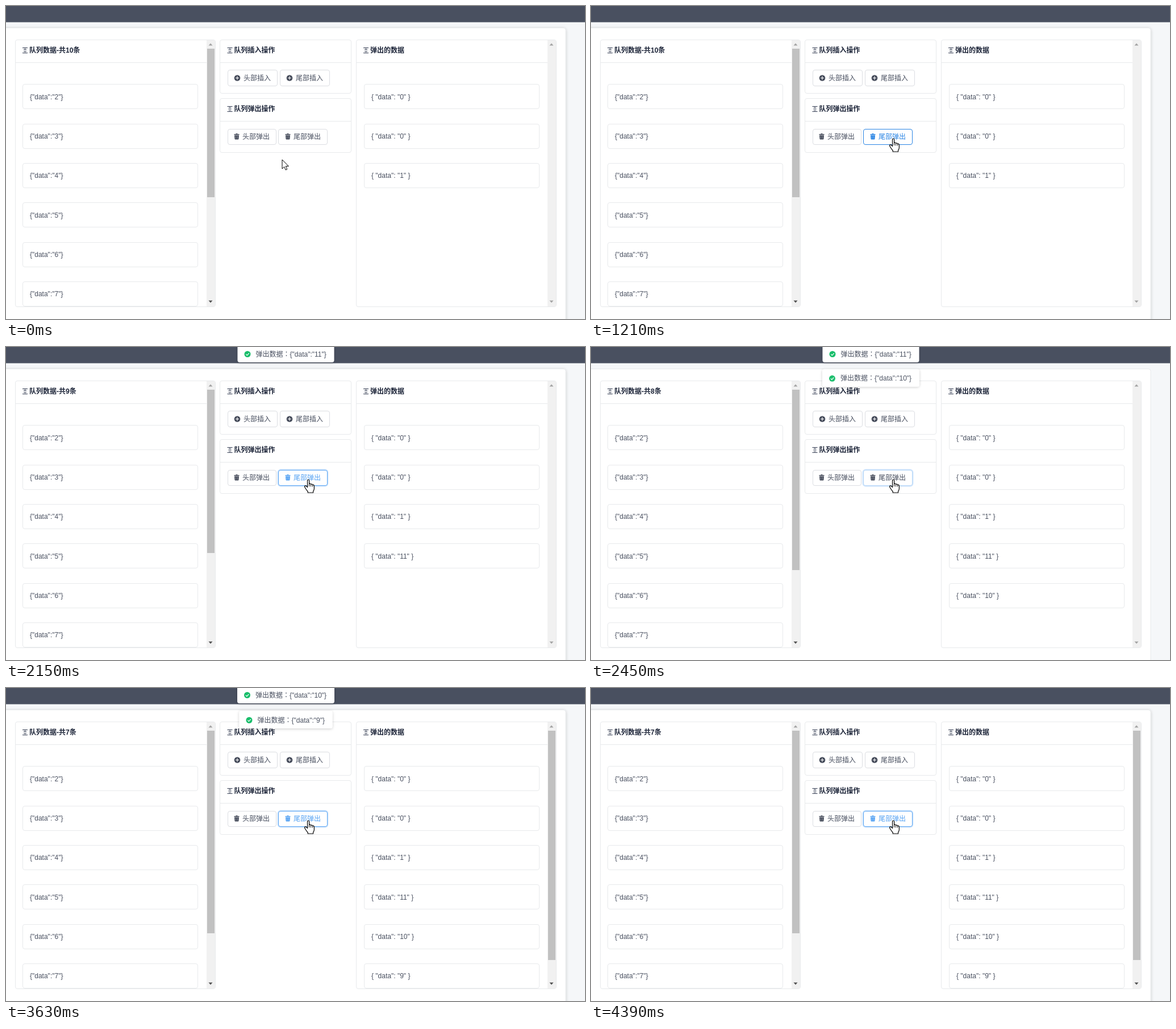
An HTML page for the animation above (4560 ms loop, 1019 by 550 pixels).

```html
<!DOCTYPE html>
<html lang="zh-CN">
<head>
<meta charset="utf-8">
<title>队列操作</title>
<style>
  html, body { margin: 0; width: 100%; height: 100%; overflow: hidden; background: #f5f7f9; }
  svg { display: block; width: 1019px; height: 550px; }
  text { font: 12px "Liberation Sans", Arial, "Noto Sans CJK SC", "Noto Sans CJK", sans-serif; fill: #495060; white-space: pre; }
  .title { font-weight: 700; fill: #1c2438; }
  .colon { font-family: "Noto Sans CJK JP", "Noto Sans CJK", sans-serif; }
  .box { fill: #fff; stroke: #e8eaec; }
  .btn { fill: #fff; stroke: #dcdee2; }
</style>
</head>
<body>
<svg id="stage" viewBox="0 0 1019 550"></svg>
<script>
const LOOP = 4560, SLOT = 44;
const stage = document.getElementById('stage');

const TICKS = [0, 690, 760, 830, 910, 980,
  1140, 1210, 1290, 1370, 1450, 1530, 1610,
  2070, 2150, 2220, 2300, 2380, 2450,
  2620, 2700, 2770, 2840, 2910, 3000, 3080, 3150,
  3630, 3690, 3770, 3850, 3920, 4240, 4320, 4390];
const POPS = [1290, 2220, 2700];
const THUMB_ENDS = [336, 362, 392, 431];
const MESSAGES = [
  { value: 11, width: 170, enter: 1270, leave: 2776 },
  { value: 10, width: 171, enter: 2180, leave: 3630 },
  { value: 9, width: 164, enter: 2690, leave: 4195 }
];

const clamp = v => Math.max(0, Math.min(1, v));
const ease = v => { v = clamp(v); return v * v * (3 - 2 * v); };
const within = (t, a, b) => t >= a && t < b;

const rect = (x, y, w, h, attrs = '') => `<rect x="${x}" y="${y}" width="${w}" height="${h}" ${attrs}/>`;
const box = (x, y, w, h, cls = 'box') => rect(x + .5, y + .5, w, h, `rx="3.5" class="${cls}"`);
const text = (x, y, s, attrs = '') => `<text x="${x}" y="${y}" ${attrs}>${s}</text>`;
const line = (x1, x2, y) => `<path d="M${x1} ${y}H${x2}" stroke="#e8eaec"/>`;

const heading = (x, y, s, id = '') =>
  `<path d="M${x} ${y - 8.5}h9M${x + 2} ${y - 5.5}h5M${x + 2} ${y - 2.5}h5M${x} ${y + .5}h9M${x + 4.5} ${y - 8}v1.5M${x + 4.5} ${y - 1}v1.5" stroke="#30394f" fill="none"/>`
  + text(x + 12, y, s, `class="title" ${id}`);

const plus = (x, y) =>
  `<circle cx="${x}" cy="${y}" r="5.3" fill="#464c5b"/><path d="M${x - 3} ${y}h6M${x} ${y - 3}v6" stroke="#fff" stroke-width="1.2"/>`;

const trash = (x, y, id = '') =>
  `<path ${id} fill="#464c5b" d="M${x - 4.5} ${y - 4.5}h2.5l1-1h2l1 1h2.5v1.5h-9zM${x - 4} ${y - 2.3}h8l-.5 6.3q-.1 1-1 1h-5q-.9 0-1-1z"/>`
  + `<path d="M${x - 1.5} ${y - 1}v4.5M${x + 1.5} ${y - 1}v4.5" stroke="#fff" stroke-width=".6" opacity=".6"/>`;

function scrollPanel(x, title, name) {
  const bar = x + 337;
  return box(x, 59, 352, 469)
    + rect(bar, 60, 15, 468, 'fill="#f1f1f1"')
    + rect(bar + 1, 75, 13, 0, `fill="#c1c1c1" id="${name}Thumb"`)
    + `<path d="M${bar + 3.5} 69.5h7l-3.5-4z" fill="#a3a3a3"/>`
    + `<path d="M${bar + 3.5} 517.5h7l-3.5 4z" fill="#a3a3a3" id="${name}Down"/>`
    + line(x + 1, bar, 99.5)
    + heading(x + 13, 82, title, `id="${name}Title"`);
}

function row(x, i, s, attrs = '') {
  const y = 137.3 + i * 69.35;
  return `<g ${attrs}>${box(x, Math.round(y), 308, 43)}${text(x + 13, Math.round(y + 26.3), s)}</g>`;
}

function opCard(y, h, title) {
  return box(376, y, 231, h) + line(377, 607, y + 40.5) + heading(389.5, y + 23, title);
}

function message(m, i) {
  const x = 492.5 - m.width / 2;
  return `<g id="msg${i}">${rect(x, -15.5, m.width, 31, 'rx="4" fill="#fff" filter="url(#shadow)"')}
    <circle cx="${x + 17.5}" cy="1" r="5.5" fill="#19be6b"/>
    <path d="M${x + 14.8} 1.1l2 2 3.5-3.8" fill="none" stroke="#fff" stroke-width="1.2"/>
    ${text(x + 32, 5, `弹出数据<tspan class="colon" lang="ja">：</tspan>{"data":"${m.value}"}`)}</g>`;
}

const popped = [0, 0, 1, 11, 10, 9];

stage.innerHTML = `
  <defs><filter id="shadow" x="-10%" y="-40%" width="120%" height="190%">
    <feDropShadow dx="0" dy="1" stdDeviation="2.6" flood-opacity=".2"/></filter>
  <filter id="cardShadow" x="-2%" y="-2%" width="104%" height="104%">
    <feDropShadow dx="0" dy="1" stdDeviation="2.6" flood-opacity=".2"/></filter></defs>
  ${rect(0, 0, 1019, 550, 'fill="#f5f7f9"')}
  ${rect(0, 0, 1019, 28.5, 'fill="#495060"')}
  ${rect(-20, 38.5, 1005, 540, 'rx="4" fill="#fff" stroke="#e8eaec" id="page"')}
  ${scrollPanel(16, '', 'queue')}
  ${scrollPanel(616, '弹出的数据', 'popped')}
  ${[2, 3, 4, 5, 6, 7].map((n, i) => row(29, i, `{"data":"${n}"}`)).join('')}
  ${popped.map((n, i) => row(630, i, `{ "data": "${n}" }`, `id="row${i}"`)).join('')}
  ${opCard(59, 94, '队列插入操作')}
  ${opCard(162, 95, '队列弹出操作')}
  ${box(390, 112, 87, 28, 'btn')}${plus(407, 126.5)}${text(418, 131, '头部插入')}
  ${box(482, 112, 87, 28, 'btn')}${plus(499, 126.5)}${text(510, 131, '尾部插入')}
  ${box(390, 216, 85, 27, 'btn')}${trash(406, 229.5)}${text(416, 234, '头部弹出')}
  ${rect(478.5, 215.5, 88, 29, 'rx="5" fill="none" stroke="#2d8cf0" stroke-opacity=".22" stroke-width="2" id="ring"')}
  ${rect(479.5, 216.5, 86, 27, 'rx="3.5" fill="#fff" id="popBtn"')}
  ${trash(496, 229.5, 'id="popIcon"')}${text(506, 234, '尾部弹出', 'id="popText"')}
  ${MESSAGES.map(message).join('')}
  <path id="arrow" d="M.5 .5V16.5L4.2 13 6.7 18.6 9.2 17.5 6.8 12H11.8Z" fill="#fff" stroke="#000"/>
  <g id="hand" stroke="#000" stroke-linejoin="round">
    <path d="M-1.5 1.2Q-1.5-.5 0-.5T1.6 1.2V7Q3.5 5.6 4.6 7.8Q6.7 6.6 7.7 8.8Q10.4 8 10.4 11V15.5Q10.2 18 8.6 20V22.5H-.8V20.5Q-3.4 17.7-5.6 13.8Q-7.2 11.2-5.7 10.2Q-4.2 9.4-1.5 13Z" fill="#fff" stroke-width="1.2"/>
    <path d="M1.6 7v4.5M4.6 8v3.8M7.7 9v3" fill="none"/>
  </g>`;

const $ = id => document.getElementById(id);
const set = (id, attrs) => { for (const k in attrs) $(id).setAttribute(k, attrs[k]); };
const show = (id, on) => set(id, { visibility: on ? 'visible' : 'hidden' });

function drawPointer(t) {
  const p = ease((t - 640) / 340);
  const x = 485.5 + 46.5 * p, y = 269.5 - 36 * p;
  const over = y < 244;
  const pos = { transform: `translate(${x} ${y})` };
  set('arrow', pos);
  set('hand', pos);
  show('arrow', !over);
  show('hand', over);
  return over;
}

function drawButton(t, over) {
  const idle = !over || within(t, 2380, 2620);
  const pressed = within(t, 1140, 1290) || within(t, 2070, 2150) || within(t, 2620, 2700);
  const focus = t >= 1290;
  const blue = pressed ? '#2b85e4' : '#57a3f3';
  set('popBtn', { stroke: !idle ? blue : focus ? '#b5d5f7' : '#dcdee2' });
  set('popIcon', { fill: idle ? '#464c5b' : blue });
  $('popText').style.fill = idle ? '#495060' : blue;
  show('ring', focus);
  set('page', { filter: idle && focus ? 'none' : 'url(#cardShadow)' });
}

function drawLists(t) {
  const n = POPS.filter(at => t >= at).length;
  $('queueTitle').textContent = `队列数据-共${10 - n}条`;
  set('queueThumb', { height: THUMB_ENDS[n] - 75 });
  set('queueDown', { fill: '#505050' });
  set('poppedThumb', { height: n === 3 ? 403 : 0 });
  set('poppedDown', { fill: n === 3 ? '#505050' : '#a3a3a3' });
  popped.forEach((_, i) => show('row' + i, i < 3 + n));
}

function drawMessages(t) {
  let top = 11.5;
  MESSAGES.forEach((m, i) => {
    const q = ease((t - m.enter) / 300), p = ease((t - m.leave) / 300);
    const last = i === MESSAGES.length - 1;
    const lift = last ? SLOT * p : SLOT * p * (1 - p) + 6 * p;
    const y = top - SLOT * (1 - q) - lift;
    set('msg' + i, { transform: `translate(0 ${y})`, opacity: q * (1 - p) });
    top += SLOT * (1 - p);
  });
}

function render(time) {
  const t = TICKS.filter(at => at <= time).pop();
  drawButton(t, drawPointer(t));
  drawLists(t);
  drawMessages(t);
}

const start = performance.now();
function loop() {
  render((performance.now() - start) % LOOP);
  requestAnimationFrame(loop);
}
loop();
</script>
</body>
</html>
```
